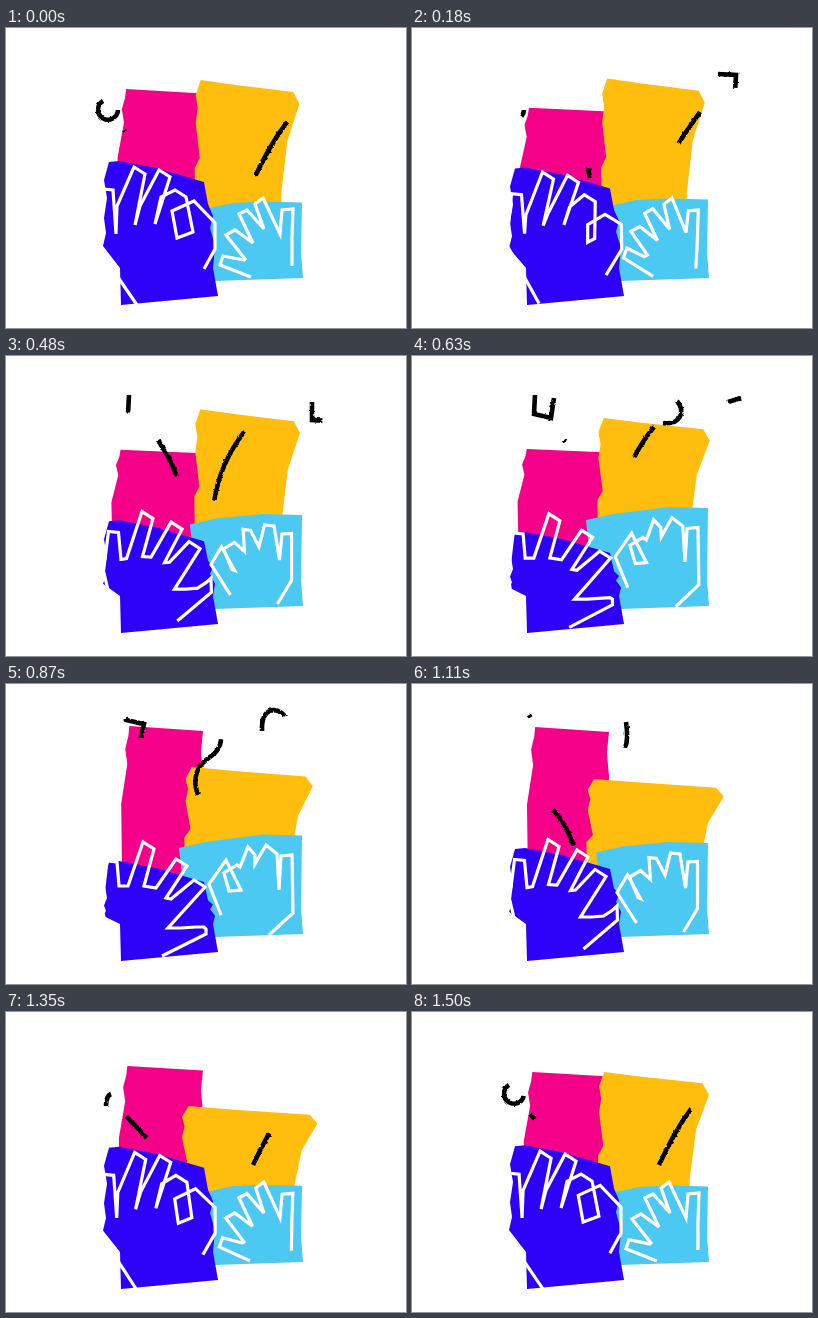
Recreate the animation shown at these times as an HTML page. Size 400 by 300 pixels, loop 1.53 s.

```html
<!DOCTYPE html>
<html>
<head>
<meta charset="utf-8">
<style>
html, body { margin: 0; width: 100%; height: 100%; overflow: hidden; background: #fff; }
svg { display: block; width: 400px; height: 300px; fill: none; }
</style>
</head>
<body>
<svg viewBox="0 0 400 300">
  <filter id="rough" filterUnits="userSpaceOnUse" x="0" y="0" width="400" height="300" color-interpolation-filters="sRGB">
    <feTurbulence type="fractalNoise" baseFrequency=".3" numOctaves="1" seed="4"/>
    <feDisplacementMap in="SourceGraphic" scale="3" xChannelSelector="R" yChannelSelector="G"/>
  </filter>
  <path id="pink" fill="#f50089"/>
  <path id="yellow" fill="#ffbe0d"/>
  <path id="cyan" fill="#4cc9f3"/>
  <path id="blue" fill="#2d00f8"/>
  <g stroke="#fff" stroke-width="3.2">
    <path id="leftHand"/>
    <path id="rightHand"/>
  </g>
  <g id="marks" stroke="#000" stroke-width="4.6" filter="url(#rough)"/>
</svg>
<script>
const LOOP = 1530, STEP = 30;
const KEYS = [0, 360, 630, 870, 1110, 1350, 1500];
const $ = id => document.getElementById(id);
const lerp = (a, b, k) => a + (b - a) * k;
const clamp = k => Math.max(0, Math.min(1, k));
const pairs = flat => flat.flatMap((x, i) => i % 2 ? [] : [[x, flat[i + 1]]]);
const line = points => 'M' + points.map(p => p.map(c => c.toFixed(2))).join('L');

// Smooth periodic curve through one value per key, without overshoot
function track(...v) {
  const n = KEYS.length;
  const span = i => (i === n - 1 ? LOOP : KEYS[i + 1]) - KEYS[i];
  const rate = i => (v[(i + 1) % n] - v[i]) / span(i);
  const slope = i => {
    const a = rate((i + n - 1) % n), b = rate(i);
    return a * b > 0 ? 2 * a * b / (a + b) : 0;
  };
  return t => {
    const i = KEYS.findLastIndex(k => k <= t), j = (i + 1) % n;
    const h = span(i), s = (t - KEYS[i]) / h, r = 1 - s;
    return v[i] * (1 + 2 * s) * r * r + h * slope(i) * s * r * r
         + v[j] * s * s * (3 - 2 * s) - h * slope(j) * s * s * r;
  };
}

// Hands and lower blocks share one pose value, 0 to 2
const pose = track(0, 1, 1.96, 2, 1.5, .1, .01);
const pinkTop = track(61, 94, 93, 42, 43, 54, 60);
const yellowTop = track(52, 50, 62, 83, 95, 94, 60);

function blend(poses, p) {
  const i = p < 1 ? 0 : 1;
  return poses[i].map((c, n) => lerp(c, poses[i + 1][n], p - i));
}

// Stretches a shape between a moving top and a fixed bottom
function stretch(shape, width, height, left, right, top, bottom) {
  const sx = (right - left) / width, sy = (bottom - top) / height;
  return line(pairs(shape).map(([x, y]) => [left + x * sx, top + y * sy]));
}

const pinkShape = [0, 0, 72, 5, 70, 26, 72, 50, 70, 158, -7, 158, -8, 78, -2, 38, -4, 23, -1, 10];
const pink = top => stretch(pinkShape, 72, 158, 130.5 - .17 * top, 197, top, 200);

const yellowShape = [0, 0, 35, 5, 92, 12, 98, 24, 86, 61, 80, 113, 80, 153,
  -5, 153, -6, 88, -1, 78, -5, 43, -3, 28, -5, 15];
const yellow = top => {
  const drop = top - 51;
  return stretch(yellowShape, 98, 153, 195 - .29 * drop, 293 + .43 * drop, top, 205);
};

const blueShape = [103, 134, 113, 133, 150, 140, 198, 154, 202, 176, 207, 188, 204, 200, 209, 218, 207, 240, 212, 268,
  115, 277, 114, 240, 97, 218, 100, 205, 98, 190, 101, 170, 98, 152];
const blue = p => {
  const drop = p < 1 ? 18 * p : 26 * p - 8;
  return line(pairs(blueShape).map(([x, y]) => [x, y + drop * clamp((240 - y) / 70)]));
};

const cyan = p => {
  const [x, y, r] = blend([[200, 181, 174], [195, 173, 166], [173, 164, 151]], p);
  return line([[x, y], [x + 26, y - 6], [256, r - .5], [296, r + .5], [295, 225], [297, 250], [208, 253], [x + 3, y + 26]]);
};

const leftOpen = [131, 277, 92, 220, 97, 161, 110, 206, 111, 178, 128, 139, 129, 197, 134, 178, 153, 142, 149, 196,
  155, 169, 169, 162, 187, 204, 171, 210, 166, 183, 188, 173, 209, 195, 209, 221, 198, 241];
const leftMid = [120, 273, 99, 210, 104, 174, 117, 205, 119, 203, 135, 153, 135, 199, 140, 198, 160, 157, 157, 199,
  162, 197, 178, 175, 175, 222, 184, 222, 193, 221, 202, 210, 210, 199, 211, 222, 187, 258];
const leftSpread = [105, 282, 96, 220, 101, 177, 113, 202, 122, 202, 137, 158, 138, 202, 150, 204, 170, 175, 160, 214,
  165, 215, 188, 196, 162, 244, 175, 244, 190, 243, 198, 243, 200, 245, 200, 250, 156, 272];

// Every third point of the left hand's fingers is a flat tip
function leftHand(p) {
  const points = pairs(blend([leftOpen, leftMid, leftSpread], p));
  return line(points.flatMap(([x, y], i) =>
    i === 2 ? [[x, y], [x + 10, y + 1]] :
    i < 12 && i % 3 === 2 ? [[x, y], [x + 11, y + 7]] : [[x, y]]));
}

const rightOpen = [245, 249, 214, 237, 217, 228, 238, 232, 239, 231, 220, 207, 229, 202, 247, 215, 233, 186, 241, 182,
  258, 201, 249, 176, 257, 170, 274, 206, 276, 182, 287, 181, 286, 210, 286, 238];
const rightMid = [234, 247, 207, 217, 211, 206, 222, 223, 229, 220, 217, 197, 226, 192, 243, 208, 232, 184, 240, 178,
  257, 202, 257, 177, 265, 170, 274, 202, 277, 184, 285, 184, 284, 220, 280, 245];
const rightCurl = [215, 231, 202, 208, 204, 192, 220, 176, 235, 206, 223, 207, 218, 189, 231, 181, 242, 163, 249, 171,
  249, 180, 260, 161, 271, 170, 273, 206, 275, 172, 286, 171, 287, 229, 263, 251];
// The curled thumb has one corner more, and its second finger one less
rightCurl.splice(16, 0, 234, 183);
rightCurl.splice(2, 4, 203, 200);
const rightHand = p => line(pairs(blend([rightOpen, rightMid, rightCurl], p)));

// A black stroke: its head runs from start to drawn, its tail from erase to end
const marks = [];
function mark(d, start, drawn, erase, end) {
  const el = document.createElementNS('http://www.w3.org/2000/svg', 'path');
  el.setAttribute('d', d);
  el.setAttribute('pathLength', 1);
  $('marks').append(el);
  marks.push(t => {
    if (t < start) t += LOOP;
    const head = Math.sin(clamp((t - start) / (drawn - start)) * Math.PI / 2);
    const tail = clamp((t - erase) / (end - erase));
    el.style.display = head - tail > .005 ? '' : 'none';
    el.setAttribute('stroke-dasharray', `0 ${tail} ${Math.max(0, head - tail)} 2`);
  });
}

mark('M105,82Q100,84 100,94', 1230, 1350, 1350, 1410);
mark('M97,73A10 10 0 1 0 112,82', 1380, 1530, 1560, 1740);
mark('M163,165Q153,137 140,125L118,102', 890, 1450, 1090, 1540);
mark('M247,153Q263,118 279,97L288,84', 1200, 1710, 1500, 1900);
mark('M178,150Q172,115 158,94L152,84', 150, 490, 360, 640);
mark('M207,157Q210,110 242,71', 320, 526, 440, 746);
mark('M306,46L324,47L323,65L306,64Z', 120, 330, 390, 540);
mark('M98,69L104,71', 300, 330, 390, 420);
mark('M123,39L122,58L139,62L142,42', 450, 600, 660, 810);
mark('M251,67C268,69 274,56 265,45', 510, 630, 630, 750);
mark('M316,46L329,42', 540, 600, 660, 720);
mark('M256,47C255,22 272,23 279,32', 720, 870, 870, 1020);
mark('M135,54L138,40L120,36L117,31', 720, 939, 870, 1130);
mark('M192,111C185,92 193,80 204,73S217,58 214,38', 690, 1000, 950, 1185);

function draw(now) {
  const t = Math.floor(now % LOOP / STEP) * STEP;
  const p = pose(t);
  const set = (id, d) => $(id).setAttribute('d', d);
  set('pink', pink(pinkTop(t)));
  set('yellow', yellow(yellowTop(t)));
  set('cyan', cyan(p));
  set('blue', blue(p));
  set('leftHand', leftHand(p));
  set('rightHand', rightHand(p));
  marks.forEach(update => update(t));
}

const start = performance.now();
function tick() {
  draw(performance.now() - start);
  requestAnimationFrame(tick);
}
tick();
</script>
</body>
</html>
```
